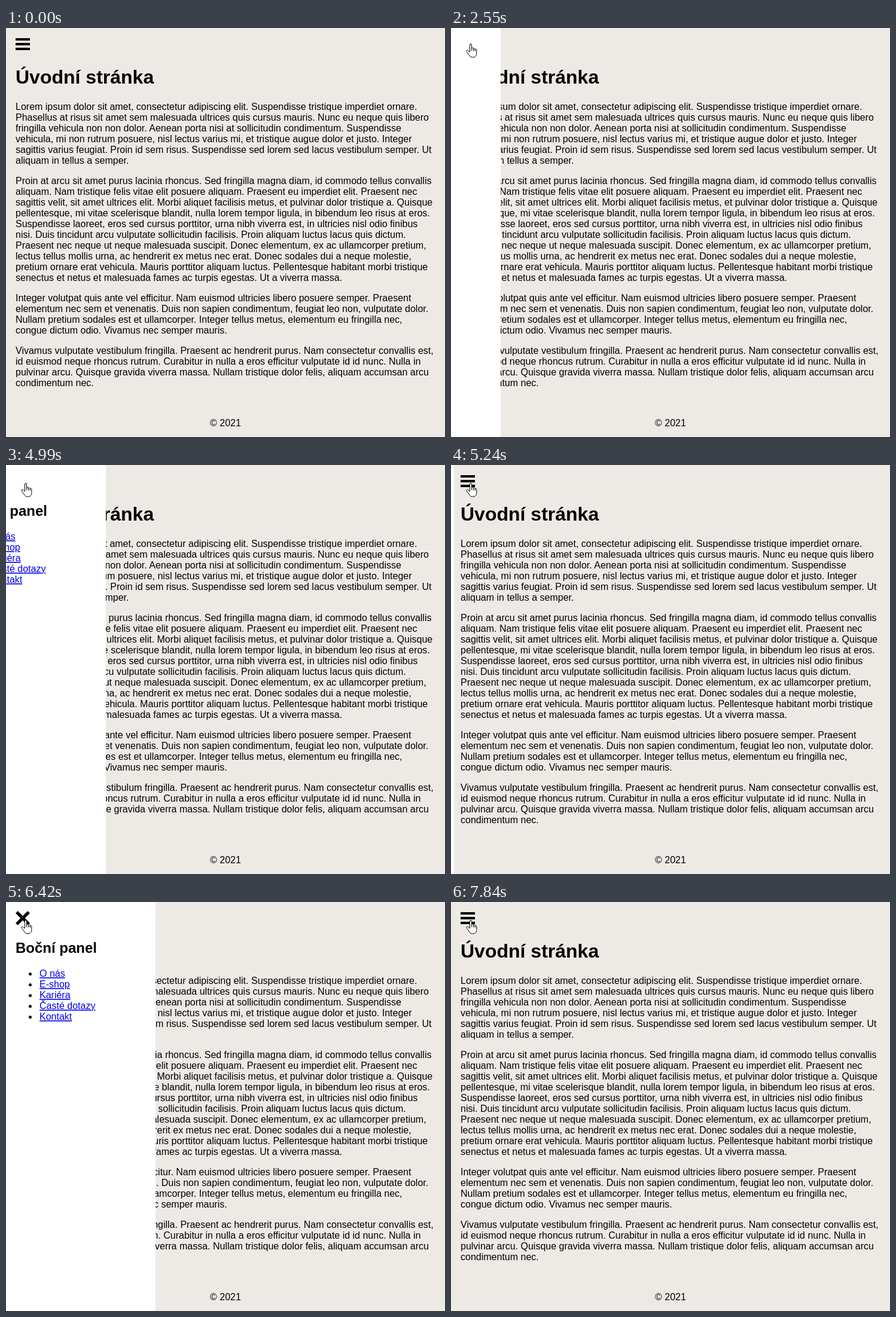
Write an HTML page that moves like this. It is 734 by 684 pixels and loops after 8 s.

```html
<!DOCTYPE html>
<html lang="cs">
<head>
<meta charset="utf-8">
<title>Boční panel</title>
<style>
  html, body { margin: 0; width: 100%; height: 100%; overflow: hidden; background: #edeae5; }
  svg { display: block; }
  text { font: 16px "Liberation Sans", Arial, sans-serif; white-space: pre; }
  .h1 { font-size: 32px; font-weight: bold; }
  .h2 { font-size: 24px; font-weight: bold; }
  .link { fill: #00e; text-decoration: underline 1px; text-underline-offset: 2px; }
  #arrow, #hand { fill: #fff; stroke: #000; stroke-linejoin: round; }
</style>
</head>
<body>
<svg id="stage" width="734" height="684" viewBox="0 0 734 684">
  <g id="page">
    <path d="M16 17h24v4h-24zm0 8h24v4h-24zm0 8h24v4h-24z"/>
    <text class="h1" x="16" y="93">Úvodní stránka</text>
    <text x="367" y="666" text-anchor="middle">© 2021</text>
  </g>
  <g id="panel">
    <rect width="250" height="684" fill="#fff"/>
    <path transform="translate(16 15)" d="M24 20.2L15.7 12 23.9 3.7 20.2 0 12 8.3 3.7.1 0 3.8 8.3 12 .1 20.3 3.8 24 12 15.7 20.3 23.9z"/>
    <text class="h2" x="16" y="85">Boční panel</text>
  </g>
  <g id="cursor">
    <path id="arrow" d="M.5.5v16l3.7-3.6 2.6 6 2.2-1-2.5-5.9h5z"/>
    <path id="hand" d="M.5 14V2a1.5 1.5 0 0 1 3 0v6.5c0-2 2.9-2 2.9 0v1c0-2 2.8-2 2.8 0v1c0-2 2.6-1.6 2.6 0v6c0 4-2.6 6.5-6 6.5h-1c-2.4 0-3.8-1-5-3l-4.6-6.5c-1-1.6.8-3 2.2-1.8zM3.5 8v4M6.4 9v3.5M9.2 10v3"/>
  </g>
</svg>
<script>
const paragraphs = [
`Lorem ipsum dolor sit amet, consectetur adipiscing elit. Suspendisse tristique imperdiet ornare.
Phasellus at risus sit amet sem malesuada ultrices quis cursus mauris. Nunc eu neque quis libero
fringilla vehicula non non dolor. Aenean porta nisi at sollicitudin condimentum. Suspendisse
vehicula, mi non rutrum posuere, nisl lectus varius mi, et tristique augue dolor et justo. Integer
sagittis varius feugiat. Proin id sem risus. Suspendisse sed lorem sed lacus vestibulum semper. Ut
aliquam in tellus a semper.`,
`Proin at arcu sit amet purus lacinia rhoncus. Sed fringilla magna diam, id commodo tellus convallis
aliquam. Nam tristique felis vitae elit posuere aliquam. Praesent eu imperdiet elit. Praesent nec
sagittis velit, sit amet ultrices elit. Morbi aliquet facilisis metus, et pulvinar dolor tristique a. Quisque
pellentesque, mi vitae scelerisque blandit, nulla lorem tempor ligula, in bibendum leo risus at eros.
Suspendisse laoreet, eros sed cursus porttitor, urna nibh viverra est, in ultricies nisl odio finibus
nisi. Duis tincidunt arcu vulputate sollicitudin facilisis. Proin aliquam luctus lacus quis dictum.
Praesent nec neque ut neque malesuada suscipit. Donec elementum, ex ac ullamcorper pretium,
lectus tellus mollis urna, ac hendrerit ex metus nec erat. Donec sodales dui a neque molestie,
pretium ornare erat vehicula. Mauris porttitor aliquam luctus. Pellentesque habitant morbi tristique
senectus et netus et malesuada fames ac turpis egestas. Ut a viverra massa.`,
`Integer volutpat quis ante vel efficitur. Nam euismod ultricies libero posuere semper. Praesent
elementum nec sem et venenatis. Duis non sapien condimentum, feugiat leo non, vulputate dolor.
Nullam pretium sodales est et ullamcorper. Integer tellus metus, elementum eu fringilla nec,
congue dictum odio. Vivamus nec semper mauris.`,
`Vivamus vulputate vestibulum fringilla. Praesent ac hendrerit purus. Nam consectetur convallis est,
id euismod neque rhoncus rutrum. Curabitur in nulla a eros efficitur vulputate id id nunc. Nulla in
pulvinar arcu. Quisque gravida viverra massa. Nullam tristique dolor felis, aliquam accumsan arcu
condimentum nec.`];
const links = ['O nás', 'E-shop', 'Kariéra', 'Časté dotazy', 'Kontakt'];

const LOOP = 8000, LINE = 18, WIDTH = 250, SLIDE = 400;
const $ = id => document.getElementById(id);

function add(parent, tag, attrs, text = '') {
  const el = document.createElementNS('http://www.w3.org/2000/svg', tag);
  for (const key in attrs) el.setAttribute(key, attrs[key]);
  el.textContent = text;
  parent.append(el);
}

let y = 137;
for (const p of paragraphs) {
  for (const line of p.split('\n')) {
    add($('page'), 'text', { x: 16, y }, line);
    y += LINE;
  }
  y += 16;
}
links.forEach((label, i) => {
  const base = 125 + i * LINE;
  add($('panel'), 'circle', { cx: 40.5, cy: base - 4.5, r: 2.5 });
  add($('panel'), 'text', { x: 56, y: base, class: 'link' }, label);
});

// The panel moves in ticks; lead is the time already run at the first one.
const slides = [
  { at: 2390, tick: 52, lead: 0, open: true },
  { at: 4830, tick: 52, lead: 0, open: false },
  { at: 6010, tick: 58, lead: 20, open: true },
  { at: 7420, tick: 52, lead: 0, open: false }
];

// Pointer hot spot: time, x, y
const path = [
  [500, -3, 103], [750, 14, 62], [1000, 29, 36], [1260, 37, 25], [1360, 37, 23],
  [1550, 37, 23], [1730, 31, 26], [3739, 31, 26], [3740, 47, 26], [3870, 96, 35],
  [4100, 96, 35], [4250, 78, 34], [4500, 39, 31], [4660, 31, 30], [LOOP, 31, 30]
];

const swing = x => 0.5 - Math.cos(Math.PI * Math.min(x, 1)) / 2;

function panelEdge(t) {
  const s = slides.filter(s => s.at <= t).pop();
  if (!s) return 0;
  const run = Math.floor((t - s.at) / s.tick) * s.tick + s.lead;
  const k = swing(run / SLIDE);
  return Math.round(WIDTH * (s.open ? k : 1 - k));
}

function pointer(t) {
  const i = path.findIndex(p => p[0] > t);
  const [t0, x0, y0] = path[i - 1], [t1, x1, y1] = path[i];
  const k = (t - t0) / (t1 - t0);
  return [Math.round(x0 + (x1 - x0) * k), Math.round(y0 + (y1 - y0) * k)];
}

const show = (el, on) => el.setAttribute('visibility', on ? 'visible' : 'hidden');

function draw(t) {
  $('panel').setAttribute('transform', `translate(${panelEdge(t) - WIDTH} 0)`);
  const seen = t >= path[0][0];
  const [px, py] = seen ? pointer(t) : [0, 0];
  const overIcon = px >= 16 && px < 40 && py >= 15 && py < 39;
  $('cursor').setAttribute('transform', `translate(${px} ${py})`);
  show($('hand'), seen && overIcon);
  show($('arrow'), seen && !overIcon);
}

const start = performance.now();
function frame() {
  draw((performance.now() - start) % LOOP);
  requestAnimationFrame(frame);
}
frame();
</script>
</body>
</html>
```
